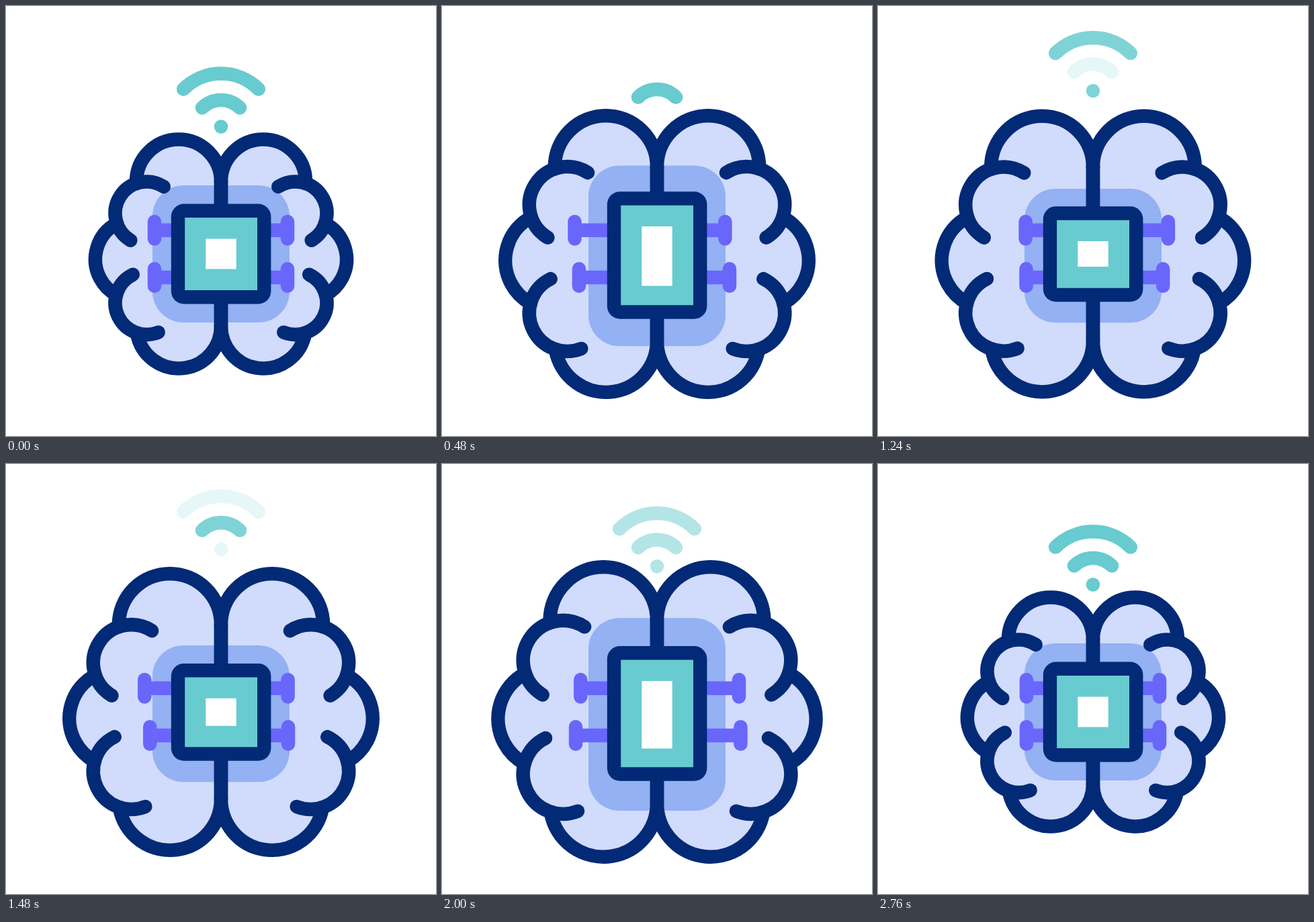
An HTML page with a canvas for the animation above (3000 ms loop, 640x640 px).

```html
<!DOCTYPE html>
<html lang="en">
<head>
<meta charset="utf-8">
<title>Smart brain</title>
<style>
html, body { margin: 0; width: 100%; height: 100%; overflow: hidden; background: #fff; }
canvas { display: block; width: 640px; height: 640px; }
</style>
</head>
<body>
<canvas id="stage" width="640" height="640"></canvas>
<script>
const ctx = document.getElementById('stage').getContext('2d');
const NAVY = '#022a76', LILAC = '#d1dbfb', BLUE = '#93b1f3', TEAL = '#68cbcf', PURPLE = '#6966fb';
const LOOP = 3000, REST = 2760, STEP = 40, LINE = 20.5;
const CX = 320, CY = 369;
const KEYS = [0, 687, 1344, 2000, 2660];

const clamp = u => Math.min(1, Math.max(0, u));
const ease = u => { u = clamp(u); return u * u * (3 - 2 * u); };
const mix = (a, b, u) => a + (b - a) * u;

// Eased value through rest, wide, narrow, wide, rest.
function pulse(t, rest, wide, narrow) {
  const values = [rest, wide, narrow, wide, rest];
  let i = 0;
  while (i < 3 && t >= KEYS[i + 1]) i++;
  return mix(values[i], values[i + 1], ease((t - KEYS[i]) / (KEYS[i + 1] - KEYS[i])));
}

// Eased swing 1 -> 0 -> 1, each way taking half a period.
const swing = (t, half) => ease(Math.abs(1 - (t / half) % 2));

// Lobes of the left half: centre, radius, start and end point of the outline.
const LOBES = [
  [193.5, 377, 60.5, 165, 323.6, 164, 429.9],
  [257, 261.5, 63, 320, 261.5, 194.1, 264.1],
  [257, 476.5, 63, 194.8, 486.7, 320, 476.5],
  [209.5, 308.5, 47, 235, 268.5, 185, 349.5],
  [209.5, 442, 47, 189, 400, 227, 486.5]
];

function drawHalf(scale, paint) {
  const sx = x => (x - CX) * scale;
  const sy = y => (y - CY) * scale;
  for (const [x, y, r, x0, y0, x1, y1] of LOBES) {
    ctx.beginPath();
    if (paint === 'fill') ctx.arc(sx(x), sy(y), r * scale, 0, 7);
    else ctx.arc(sx(x), sy(y), r * scale, Math.atan2(y0 - y, x0 - x), Math.atan2(y1 - y, x1 - x), true);
    ctx[paint]();
  }
  ctx.beginPath();
  if (paint === 'fill') {
    const core = [[320, 261.5], [257, 261.5], [209.5, 308.5], [193.5, 377], [209.5, 442], [257, 476.5], [320, 476.5]];
    core.forEach(([x, y]) => ctx.lineTo(sx(x), sy(y)));
  } else {
    ctx.moveTo(0, sy(261.5));
    ctx.lineTo(0, sy(476.5));
  }
  ctx[paint]();
}

function drawBrain(scale, paint) {
  for (const side of [1, -1]) {
    ctx.save();
    ctx.translate(CX, CY);
    ctx.scale(side, 1);
    drawHalf(scale, paint);
    ctx.restore();
  }
}

function box(left, top, right, bottom, color, radius = 0) {
  ctx.fillStyle = color;
  ctx.beginPath();
  ctx.roundRect(left, top, right - left, bottom - top, radius);
  ctx.fill();
}

function drawPin(t, side, y, delay) {
  const active = Math.min(2320, Math.max(0, t - delay));
  const x = CX + side * (99 + 25.5 * (1 - swing(active, 580)));
  ctx.strokeStyle = PURPLE;
  ctx.beginPath();
  ctx.moveTo(CX + side * 64, y);
  ctx.lineTo(x, y);
  ctx.moveTo(x, y - 12.8);
  ctx.lineTo(x, y + 12.8);
  ctx.stroke();
}

function drawSignal(t) {
  const y = 179.6 - 54.3 * (t < KEYS[2] ? ease(t / KEYS[2]) : 1 - ease((t - KEYS[2]) / (KEYS[4] - KEYS[2])));
  const arc = (radius, alpha) => {
    ctx.globalAlpha = alpha;
    ctx.beginPath();
    ctx.arc(CX, y, radius, -Math.PI * 0.75, -Math.PI * 0.25);
    ctx.stroke();
  };
  ctx.strokeStyle = ctx.fillStyle = TEAL;
  arc(79, swing(Math.min(t, 2560), 160));
  arc(39.7, 1 - swing(Math.min(2720, Math.max(160, t)), 160));
  ctx.globalAlpha = swing(Math.min(t, 2240), 160);
  ctx.beginPath();
  ctx.arc(CX, y, 10.3, 0, 7);
  ctx.fill();
  ctx.globalAlpha = 1;
}

function draw(t) {
  ctx.fillStyle = '#fff';
  ctx.fillRect(0, 0, 640, 640);
  ctx.lineWidth = LINE;
  ctx.lineCap = 'round';

  drawSignal(t);

  const scale = pulse(t, 1, 1.265, 1.2);
  ctx.fillStyle = LILAC;
  drawBrain(scale, 'fill');
  box(218, 267 + pulse(t, 0, -37.8, 8), 422, 471 + pulse(t, 0, 45, -3), BLUE, 46);
  ctx.strokeStyle = NAVY;
  drawBrain(scale, 'stroke');

  drawPin(t, -1, 333.8, 0);
  drawPin(t, -1, 404, 124);
  drawPin(t, 1, 404, 248);
  drawPin(t, 1, 333.8, 372);

  const rise = pulse(t, 0, -23.5, 5.5);
  const drop = pulse(t, 0, 28.3, -5.5);
  box(245.8, 294.6 + rise, 394.4, 443.5 + drop, NAVY, 19);
  box(266.2, 315.1 + rise, 374, 423 + drop, TEAL);
  box(297.3, 346.5 + rise, 342.7, 391.5 + pulse(t, 0, 32, -6), '#fff');
}

const start = performance.now();
function tick() {
  const t = (performance.now() - start) % LOOP;
  draw(Math.min(REST, Math.floor(t / STEP) * STEP));
  requestAnimationFrame(tick);
}
tick();
</script>
</body>
</html>
```
